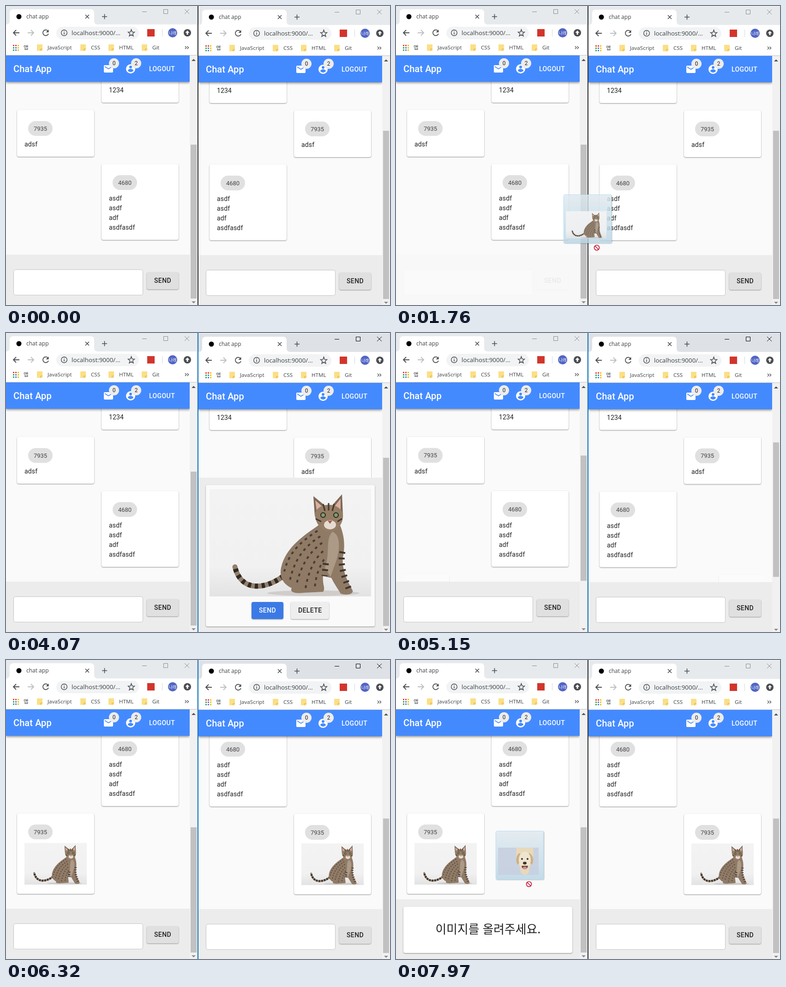
An HTML page that plays this animation: 832 px wide and 647 px high, repeating every 8000 ms.

```html
<!DOCTYPE html>
<html lang="ko">
<head>
<meta charset="utf-8">
<title>chat app</title>
<style>
html, body { margin: 0; width: 100%; height: 100%; overflow: hidden; background: #fafafa; }
#stage { display: block; width: 832px; height: 647px; }
text { font-family: Roboto, sans-serif; fill: #212121; white-space: pre; }
.ui { font-family: "Open Sans", "Noto Sans CJK KR", sans-serif; fill: #3c4043; }
.ko { font-family: "Noto Sans CJK KR", "Noto Sans CJK", sans-serif; }
.btn { font-size: 14px; font-weight: 500; letter-spacing: .4px; }
.msg { font-size: 14px; letter-spacing: .15px; }
.mid { text-anchor: middle; }
.card { filter: drop-shadow(0 1px 1.2px rgba(0,0,0,.42)); }
.raised { filter: drop-shadow(0 1.5px 1.3px rgba(0,0,0,.38)); }
.bar { filter: drop-shadow(0 2px 2.5px rgba(0,0,0,.45)); }
.line { fill: none; stroke: #4a4d51; stroke-width: 1.8; }
</style>
</head>
<body>
<svg id="stage" viewBox="0 0 832 647" width="832" height="647">
  <defs>
    <linearGradient id="studio" x1="0" y1="0" x2="0" y2="1">
      <stop offset="0" stop-color="#f3f3f4"/><stop offset=".72" stop-color="#f1f1f2"/><stop offset="1" stop-color="#e3e3e4"/>
    </linearGradient>
    <linearGradient id="glass" x1="0" y1="0" x2="0" y2="1">
      <stop offset="0" stop-color="#eef9ff" stop-opacity=".75"/><stop offset="1" stop-color="#c3e3f5" stop-opacity=".75"/>
    </linearGradient>
    <symbol id="cat" viewBox="0 0 350 232" preserveAspectRatio="none">
      <rect width="350" height="232" fill="url(#studio)"/>
      <ellipse cx="225" cy="225" rx="100" ry="6" fill="#cfccca"/>
      <g fill="none" stroke-linecap="butt">
        <path d="M160 188C120 218 68 222 55 168" stroke="#94806b" stroke-width="11" stroke-linecap="round"/>
        <path d="M160 188C120 218 68 222 55 168" stroke="#2f2924" stroke-width="11" stroke-dasharray="7 8"/>
      </g>
      <path d="M236 78C205 100 165 125 155 170C150 195 165 208 178 214C172 224 190 226 205 224L246 222C252 214 244 206 246 188L264 192C270 205 280 218 284 226C296 230 312 228 310 219C298 198 284 168 290 142C295 112 288 90 282 76Z" fill="#8f7a66"/>
      <path d="M266 92C284 98 284 130 272 162L262 190L250 170C262 140 250 110 266 92Z" fill="#ad9a86"/>
      <g fill="none" stroke="#4b3d32" stroke-width="4" stroke-dasharray="6 8">
        <path d="M234 90C200 112 172 135 162 178"/><path d="M240 102C208 122 184 150 174 198"/>
        <path d="M244 116C216 136 198 165 188 208"/><path d="M246 134C228 150 214 178 208 214"/>
        <path d="M248 152C240 165 230 185 228 214"/>
      </g>
      <path d="M288 135C282 165 292 190 304 222M252 160L249 188" fill="none" stroke="#3f342b" stroke-width="13" stroke-dasharray="4 9"/>
      <path d="M228 58L225 15L252 37ZM264 37L287 11L289 56Z" fill="#7c6856"/>
      <path d="M232 46L229 24L246 39ZM270 38L284 20L284 44Z" fill="#d9b0a1"/>
      <path d="M228 55C232 28 282 26 289 54C291 76 274 92 260 92C244 92 230 76 228 55Z" fill="#957d66"/>
      <path d="M246 32L250 47M258 30V46M270 32L266 47M230 64L242 70M287 64L277 70" stroke="#43372e" stroke-width="3"/>
      <ellipse cx="261" cy="77" rx="13" ry="10" fill="#e6dcd1"/>
      <path d="M256 68H266L261 75Z" fill="#a75e4e"/>
      <g fill="#7f9c69" stroke="#2a2520" stroke-width="2"><circle cx="246" cy="56" r="5"/><circle cx="274" cy="56" r="5"/></g>
    </symbol>
    <symbol id="dog" viewBox="0 0 88 60" preserveAspectRatio="none">
      <rect width="88" height="60" fill="#c8d1e1"/>
      <path d="M40 0H76C78 14 76 34 70 40L66 56C62 61 54 61 50 56L46 40C40 34 38 14 40 0Z" fill="#ead9b9"/>
      <path d="M46 12C38 18 38 32 43 38C48 34 48 22 49 14ZM68 12C78 18 78 32 73 38C68 34 68 22 66 14Z" fill="#cfae7d"/>
      <ellipse cx="58" cy="27" rx="13" ry="18" fill="#f2e6cd"/>
      <circle cx="52" cy="25" r="2" fill="#30261f"/><circle cx="64" cy="25" r="2" fill="#30261f"/>
      <ellipse cx="58" cy="34" rx="4" ry="3" fill="#30261f"/>
      <path d="M51 40H65C64 50 52 50 51 40Z" fill="#6b3a35"/><ellipse cx="58" cy="45" rx="4" ry="3" fill="#d98c8a"/>
    </symbol>
  </defs>
</svg>
<script>
const LOOP = 8000, STEP = 30, START = 500, SCROLL = 190;
const ARRIVE = 5060, SENT = 4910;
const ME = '4680', YOU = '7935';
const stage = document.getElementById('stage');

const text = (x, y, s, cls, extra = '') => `<text x="${x}" y="${y}" class="${cls}" ${extra}>${s}</text>`;
const rect = (x, y, w, h, fill, extra = '') => `<rect x="${x}" y="${y}" width="${w}" height="${h}" fill="${fill}" ${extra}/>`;
const path = (d, extra = '') => `<path d="${d}" ${extra}/>`;
const button = (x, y, w, s, fill, ink = '#212121', id = '') =>
  rect(x, y, w, 37, fill, `rx="4" class="raised" ${id}`) + text(x + 16, y + 23, s, 'btn', `style="fill:${ink}"`);

function browser() {
  const dots = ['#ea4335', '#ea4335', '#fbbc05', '#34a853', '#4285f4', '#fbbc05', '#34a853', '#4285f4', '#fbbc05'];
  const folders = [[67, 'JavaScript'], [161, 'CSS'], [222, 'HTML'], [294, 'Git']];
  return rect(0, 0, 415, 41, '#e7eaed', 'data-id="strip"')
    + path('M0 40Q8 40 8 32V15Q8 7 16 7H183Q191 7 191 15V32Q191 40 199 40Z', 'fill="#fff"')
    + '<circle cx="28" cy="23" r="5.5"/>'
    + text(44, 27, 'chat app', 'ui', 'font-size="12"')
    + path('M172 19L180 27M180 19L172 27M208 23H219M213.500 17.500V28.500', 'class="line" style="stroke-width:1.6"')
    + path('M295 12.500H305M341.500 7.500H350.500V16.500H341.500ZM387 7L397 17M397 7L387 17', 'fill="none" data-id="controls"')
    + rect(0, 40, 415, 66, '#fff')
    + path('M29 58H16M22 52L16 58L22 64', 'class="line"')
    + path('M47 58H60M54 52L60 58L54 64', 'class="line" style="stroke:#bcbec1"')
    + path('M91 54A6.200 6.200 0 1 0 92 60', 'class="line"') + path('M92.500 51V57H86.500Z', 'fill="#4a4d51"')
    + rect(109, 45, 179, 27, '#f1f3f4', 'rx="13.5"')
    + '<circle cx="126" cy="58" r="6.3" class="line" style="stroke-width:1.4"/>' + path('M126 57V61.500M126 54V55.500', 'class="line" style="stroke-width:1.5"')
    + text(142, 63, 'localhost:9000/...', 'ui', 'font-size="13.4"')
    + path('M271.500 51L273.400 56.200L278.500 56.500L274.500 60L275.900 65L271.500 62.200L267.100 65L268.500 60L264.500 56.500L269.600 56.200Z', 'class="line" style="stroke-width:1.5"')
    + rect(306, 50, 16, 16, '#d2352c') + rect(338, 50, 1, 16, '#d5d8dc')
    + '<circle cx="361" cy="58" r="10" fill="#5165c4"/>'
    + text(361, 61.5, '나래', 'ko mid', 'font-size="9" style="fill:#fff"')
    + '<circle cx="393" cy="58" r="8" fill="#4a4d51"/>' + path('M393 53L397.500 58H394.500V62H391.500V58H388.500Z', 'fill="#fff"')
    + dots.map((c, i) => rect(15 + i % 3 * 5, 84 + (i / 3 | 0) * 5, 3, 3, c)).join('')
    + text(38, 94, '앱', 'ui', 'font-size="11.5"')
    + folders.map(([x, s]) => rect(x, 83, 12, 14, '#fbdf86', 'rx="1"') + path(`M${x + 8} 97V93H${x + 12}`, 'fill="none" stroke="#d8a93a"')
      + text(x + 23, 94, s, 'ui', 'font-size="11.6"')).join('')
    + path('M388 87L391 90L388 93M392.500 87L395.500 90L392.500 93', 'class="line" style="stroke-width:1.3"')
    + rect(0, 106, 415, 1, '#bfc3c8');
}

function appBar() {
  const badge = (x, n) => `<circle cx="${x}" cy="124" r="11" fill="#ececec"/>` + text(x, 128.3, n, 'mid', 'font-size="12"');
  return rect(0, 107, 398, 57, '#448aff', 'class="bar"')
    + text(16, 143, 'Chat App', '', 'font-size="20" font-weight="500" letter-spacing=".1" style="fill:#fff"')
    + path('M20 4H4c-1.100 0-2 .9-2 2v12c0 1.100.9 2 2 2h16c1.100 0 2-.9 2-2V6c0-1.100-.9-2-2-2zm0 4l-8 5-8-5V6l8 5 8-5z', 'fill="#fff" transform="translate(210 124)"')
    + '<circle cx="270" cy="136" r="10" fill="#fff"/><circle cx="270" cy="132" r="3" fill="#448aff"/>'
    + path('M264 140C264 137 268 136 270 136S276 137 276 140Q273.500 143.200 270 143.200T264 140Z', 'fill="#448aff"')
    + badge(234, 0) + badge(282, 2)
    + text(310, 141, 'LOGOUT', 'btn', 'style="fill:#fff"');
}

// Cards sit in a clipped list whose origin is at (16, 164).
function card(x, y, h, name, body) {
  return `<g transform="translate(${x - 16} ${y - 164})">` + rect(0, 0, 167, h, '#fff', 'rx="4" class="card"')
    + rect(24, 24, 53, 32, '#e0e0e0', 'rx="16"') + text(50.5, 44.5, name, 'mid', 'font-size="13" style="fill:#424242"') + body + '</g>';
}
const lines = list => list.map((s, i) => text(16, 79 + i * 21, s, 'msg')).join('');

function messages(left) {
  const me = left ? 207 : 24, you = left ? 24 : 207;
  return '<svg x="16" y="164" width="366" height="374"><g data-id="list">'
    + card(me, 108, 101, ME, lines(['1234']))
    + card(you, 225, 101, YOU, lines(['adsf']))
    + card(me, 342, 164, ME, lines(['asdf', 'asdf', 'adf', 'asdfasdf']))
    + '<g data-id="photo">' + card(you, 522, 174, YOU, '<use href="#cat" x="16" y="64" width="135" height="90"/>') + '</g></g></svg>';
}

function footers() {
  return '<g data-id="input">' + rect(0, 538, 398, 109, '#ececec')
    + rect(16.5, 570.5, 280, 55, '#fff', 'rx="4" stroke="#c4c4c4"') + button(305, 576, 69, 'SEND', '#e0e0e0') + '</g>'
    + '<g data-id="zone">' + rect(0, 518, 398, 129, '#ececec') + rect(16, 534, 366, 100, '#fff', 'rx="4" class="card" data-id="drop"')
    + text(199.5, 592, '이미지를 올려주세요.', 'ko mid', 'font-size="25.8" font-weight="300" data-id="hint"') + '</g>'
    + '<g data-id="preview">' + rect(0, 312, 398, 335, '#ececec') + rect(16, 328, 366, 306, '#fafafa', 'rx="4" class="card"')
    + '<use href="#cat" x="24" y="337" width="350" height="232"/>'
    + button(115, 581, 69, 'SEND', '#448aff', '#fff', 'data-id="send"') + button(200, 581, 83, 'DELETE', '#eee') + '</g>';
}

function makeWindow(x, y, left) {
  const svg = document.createElementNS('http://www.w3.org/2000/svg', 'svg');
  const box = { x, y, width: 415, height: 647 };
  for (const k in box) svg.setAttribute(k, box[k]);
  svg.innerHTML = rect(0, 0, 415, 647, '#fafafa') + messages(left) + footers() + appBar()
    + rect(398, 107, 17, 540, '#f1f1f1') + rect(400, 300, 13, 333, '#c1c1c1', 'data-id="thumb"')
    + path('M402 119H411L406.500 114.500Z', 'fill="#505050"') + path('M402 639H411L406.500 643.500Z', 'fill="#8a8a8a"')
    + browser();
  stage.append(svg);
  const parts = {};
  svg.querySelectorAll('[data-id]').forEach(e => parts[e.dataset.id] = e);
  return parts;
}

const L = makeWindow(0, 0, true), R = makeWindow(417, 1, false);
const top2 = document.createElementNS('http://www.w3.org/2000/svg', 'g');
top2.innerHTML = rect(413.5, 0, 1.5, 647, '#d9dbde') + rect(415, 0, 2, 647, '#333', 'id="edge"')
  + '<g id="drag">' + rect(0.5, 0.5, 103, 104, 'url(#glass)', 'rx="2" stroke="#b4def2" style="filter:drop-shadow(1px 1px 1px rgba(0,0,0,.3))"')
  + '<use id="pic" href="#cat" x="5" y="36" width="88" height="59" opacity=".93"/>'
  + '<g id="no" fill="none" stroke="#c8102e" stroke-width="1.6"><circle cx="72" cy="115" r="5.5"/><path d="M68 111L76 119"/></g>'
  + '<g id="copy">' + rect(63.5, 106.5, 50, 18, '#fff', 'stroke="#666"') + path('M67 115.500H77M72 110.500V120.500', 'stroke="#1338a0" stroke-width="2"')
  + text(82, 119.5, '복사', 'ko', 'font-size="12" style="fill:#1c3a94"') + '</g></g>';
stage.append(top2);
const el = id => document.getElementById(id);

// [time, footer shown from then on]
const footR = [[-999, 'input'], [530, 'zone'], [1220, 'input'], [1920, 'zone'], [3220, 'preview'], [SENT - 20, 'input'], [7470, 'zone'], [7700, 'input']];
const footL = [[-999, 'input'], [1270, 'zone'], [1750, 'input'], [7710, 'zone']];
// [time, x, y]
const catPath = [[500, 745, 123], [740, 640, 180], [1100, 640, 180], [1450, 200, 310], [1760, 363, 408], [1880, 334, 409], [2510, 515, 499], [2720, 515, 499], [2840, 537, 500], [3230, 537, 500]];
const dogPath = [[7460, 690, 205], [7700, 345, 305], [7970, 216, 370], [8000, 216, 370]];
const sendTint = [[4040, 68, 138, 255], [4070, 59, 122, 230], [4130, 47, 96, 178], [4400, 47, 96, 178], [4490, 68, 138, 255]];

const clamp = p => Math.max(0, Math.min(1, p));
const span = (t, a, b) => clamp((t - a) / (b - a));
const inOut = p => p < .5 ? 4 * p ** 3 : 1 - 4 * (1 - p) ** 3;

function along(keys, t) {
  let i = 0;
  while (i < keys.length - 2 && t >= keys[i + 1][0]) i++;
  const [a, b] = [keys[i], keys[i + 1]], p = span(t, a[0], b[0]);
  return a.slice(1).map((v, k) => v + (b[k + 1] - v) * p);
}

function showFooter(w, keys, t) {
  const [from, kind] = keys.filter(k => k[0] <= t).pop();
  for (const k of ['input', 'zone', 'preview']) {
    w[k].style.display = k === kind ? '' : 'none';
    w[k].style.opacity = span(t, from, from + 140);
  }
}

function showChat(w, t, side, before, after, rate) {
  const added = t >= ARRIVE, s = SCROLL * inOut(span(t, 5120, 5607));
  const p = span(t, ARRIVE, 5690), rest = (1 - p) ** 2;
  w.list.setAttribute('transform', `translate(0 ${-s})`);
  w.photo.style.display = added ? '' : 'none';
  w.photo.style.opacity = 1 - rest;
  w.photo.setAttribute('transform', `translate(${side * 103 * rest} 0)`);
  const h = added ? after : before;
  w.thumb.setAttribute('height', h);
  w.thumb.setAttribute('y', 633 - h - (added ? (SCROLL - s) * rate : 0));
}

function setFocus(w, on) {
  w.strip.setAttribute('fill', on ? '#dee1e6' : '#e7eaed');
  w.controls.setAttribute('stroke', on ? '#000' : '#8b8d90');
}

function draw(now) {
  const raw = now % LOOP;
  const t = raw < START ? 0 : START + Math.floor((raw - START) / STEP) * STEP;
  showFooter(L, footL, t);
  showFooter(R, footR, t);
  showChat(L, t, -1, 333, 271, .51);
  showChat(R, t, 1, 364, 291, .56);

  const active = t >= 3230 && t < 6740;
  setFocus(L, false);
  setFocus(R, active);
  el('edge').setAttribute('fill', active ? '#0f7ac0' : '#333');

  const over = t >= 2000 && t < 3230;
  R.drop.setAttribute('fill', over ? '#6aa1ff' : '#fff');
  R.hint.style.fill = over ? '#fff' : '#212121';
  R.send.setAttribute('fill', `rgb(${along(sendTint, t).map(Math.round)})`);

  const cat = t >= 500 && t < 3230, dog = t >= 7460;
  el('drag').style.display = cat || dog ? '' : 'none';
  const [x, y] = along(dog ? dogPath : catPath, t);
  el('drag').setAttribute('transform', `translate(${Math.round(x)} ${Math.round(y)})`);
  el('pic').setAttribute('href', dog ? '#dog' : '#cat');
  el('no').style.display = over ? 'none' : '';
  el('copy').style.display = over ? '' : 'none';
}

const begin = performance.now();
function tick() {
  draw(performance.now() - begin);
  requestAnimationFrame(tick);
}
tick();
</script>
</body>
</html>
```
